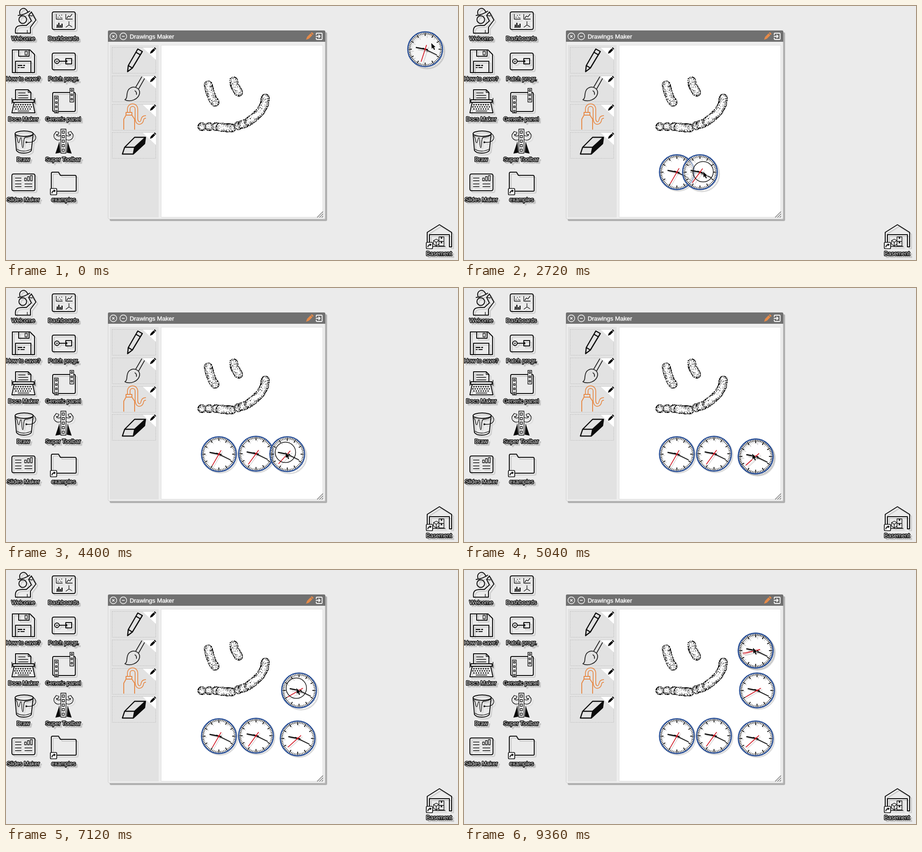
An HTML page with a canvas for the animation above (9.44 s loop, 998 by 561 pixels).

```html
<!DOCTYPE html>
<html lang="en">
<head>
<meta charset="utf-8">
<title>Drawings Maker</title>
<style>
  html, body { margin: 0; width: 100%; height: 100%; overflow: hidden; background: #ebebeb; }
  canvas { display: block; }
</style>
</head>
<body>
<canvas id="stage" width="998" height="561"></canvas>
<script>
const LOOP = 9440, STEP = 80;
const BACK = '#ebebeb', ORANGE = '#e68a48', INK = '#0c0c0c';
const stage = document.getElementById('stage');
const screen = stage.getContext('2d');
const desktop = document.createElement('canvas');
desktop.width = stage.width;
desktop.height = stage.height;
const d = desktop.getContext('2d');

// ---- path helpers ----
const box = (x, y, w, h) => `M${x},${y}h${w}v${h}h${-w}z`;
const disc = (x, y, r) => `M${x - r},${y}a${r},${r} 0 1 0 ${2 * r},0a${r},${r} 0 1 0 ${-2 * r},0z`;
const round = (x, y, w, h, r = 3) =>
  `M${x + r},${y}h${w - 2 * r}q${r},0 ${r},${r}v${h - 2 * r}q0,${r} ${-r},${r}h${2 * r - w}q${-r},0 ${-r},${-r}v${2 * r - h}q0,${-r} ${r},${-r}z`;

function line(path, color = INK, width = 2) {
  d.strokeStyle = color;
  d.lineWidth = width;
  d.stroke(new Path2D(path));
}
function fill(path, color = INK) {
  d.fillStyle = color;
  d.fill(new Path2D(path));
}
function text(str, x, y, size, color, outline) {
  d.font = `${size}px "Liberation Sans", Arial, sans-serif`;
  if (outline) {
    d.strokeStyle = outline;
    d.lineWidth = 3;
    d.strokeText(str, x, y);
  }
  d.fillStyle = color;
  d.fillText(str, x, y);
}

// ---- desktop icons ----
function icon({ label, x, y, lines = '', thin = '', solid = '', back = '', link }) {
  d.save();
  d.translate(4, 4);
  line(lines, '#cbcbcb', 2.2);
  line(thin, '#d6d6d6', 1.3);
  d.textAlign = 'center';
  text(label, x, y, 12.5, '#c6c6c6', '#c6c6c6');
  d.restore();
  line(lines, INK, 2);
  fill(back, BACK);
  line(back + thin, INK, 1.3);
  fill(solid);
  if (link) {
    const [lx, ly] = link;
    fill(round(lx, ly, 14, 14, 2), '#fff');
    line(round(lx, ly, 14, 14, 2), INK, 1.7);
    line(`M${lx + 3.5},${ly + 11}q0,-6 6,-6`, INK, 2);
    fill(`M${lx + 7.5},${ly + 2}l4.5,3.2l-4.5,3.6z`);
  }
  d.textAlign = 'center';
  text(label, x, y, 12.5, '#fff', '#000');
}

const strip = (x, y, w, count) =>
  Array.from({ length: count }, (_, i) => box(x + 2.5, y + 3 + i * (w + 1), w - 5, w - 5)).join('');
const keys = (x, y, count) =>
  Array.from({ length: count }, (_, i) => disc(x + i * 5.2, y, 1.5)).join('');

const ICONS = [
  { label: 'Welcome', x: 38, y: 76,
    lines: disc(37, 30, 8.5) + 'M26,21Q40,20 53,11M31,19C26,5 44,-1 48,14M21,60C19,46 25,43 36,43H45L56,33L50,21L56,13L66,31L54,47V60Z',
    thin: 'M51,21L59,22M47,53V60' },
  { label: 'Dashboards', x: 126.5, y: 76,
    lines: round(102, 13, 51, 39, 4),
    thin: 'M132,18V29H147M134,27L138,22L141,24L146,18M111,18V29H125M111,47H125M139,34V42L132,47M139,42L146,46',
    solid: [[115, 25], [118, 21], [120, 25], [123, 20], [123, 26]].map(p => disc(...p, .9)).join('') +
      box(112, 41, 2.5, 5) + box(115.5, 37, 2.5, 9) + box(119, 42, 2.5, 4) + box(122.5, 39, 2.5, 7) },
  { label: 'How to save?', x: 38, y: 165,
    lines: 'M14,97H53L63,107V147H14ZM28,97V111H51V97M21,147V122H55V147',
    thin: box(42, 100, 5, 8),
    solid: box(26, 130, 10, 2.5) + box(38, 130, 4, 2.5) + box(26, 135, 4, 2) + box(32, 135, 9, 2) },
  { label: 'Patch progr.', x: 127, y: 165,
    lines: round(102, 104, 51, 37, 4) + disc(112.5, 122, 5) + 'M118,122H132' + box(132, 116, 13, 12),
    solid: disc(112.5, 122, 1.5) + disc(133, 122, 2.4) },
  { label: 'Docs Maker', x: 38, y: 254,
    lines: 'M21,208V185H49L55,191V208M15,207H62V213H15ZM18,213L13,236H64L59,213',
    thin: 'M27,192H43M27,197.5H49M27,203H49M49,185V191H55M13,203V216M64,203V216M26,232H51',
    solid: keys(22, 218, 7) + keys(19.5, 222.8, 8) + keys(22, 227.5, 7) },
  { label: 'Generic panel', x: 126, y: 254,
    lines: round(103, 191, 50, 42, 3),
    back: box(107, 199, 8.5, 37) + box(141, 182, 8.5, 30),
    thin: strip(107, 199, 8.5, 4) + strip(141, 182, 8.5, 3) },
  { label: 'Draw', x: 38, y: 343,
    lines: 'M20,282a20,6 0 1 0 40,0a20,6 0 1 0 -40,0L23,319C28,327 50,327 56,319L60,282',
    thin: 'M60,281C72,290 65,303 46,301M21,287C27,290 25,302 28,302S30,291 33,291S34,313 37,313S37,291 43,290Q53,290 59,285M24,316Q38,325 56,316',
    solid: disc(45, 301, 2) },
  { label: 'Super Toolbar', x: 126, y: 343,
    thin: box(124, 276, 5, 5) + box(124, 286, 5, 5) + box(124, 296, 5, 5) + box(124, 306, 5, 5) + box(124, 316, 5, 5) +
      'M121,295C113,299 104,293 106,284L111,277L117,279L115,284L111,284Q113,289 121,286M133,295C141,299 150,293 148,284L143,277L137,279L139,284L143,284Q141,289 133,286',
    solid: 'M118,299L109,326L120,324ZM136,299L145,326L134,324Z',
    back: box(121, 272, 11.5, 53) },
  { label: 'Slides Maker', x: 38, y: 432,
    lines: round(13, 371, 51, 37, 4),
    thin: 'M20,380H34M20,386H34M20,393H34M20,399H34M41,393H58M41,399H58' +
      box(41, 380, 4, 6) + box(47.5, 377, 4, 9) + box(54, 374.5, 4, 11.5) },
  { label: 'examples', x: 127, y: 432, link: [98, 403],
    lines: 'M100,409V370Q100,367 103,367H116L120,374H152Q155,374 155,377V407Q155,409 153,409Z' },
  { label: 'Basement', x: 956, y: 551, link: [928, 522],
    lines: 'M930,528V500L957,483L984,500V532H979V505H935V528',
    thin: box(956, 510, 11, 10) + box(956, 520, 11, 10) + 'M950,515l6,3v8l-6,4l-6,-4v-8zM944,518l6,4l6,-4M950,522v8M942,531H970',
    solid: box(960, 510, 3, 4) + box(960, 520, 3, 4) },
];

// ---- window ----
function pencil(x, y, color) {
  d.save();
  d.translate(x, y);
  d.rotate(Math.PI / 4);
  fill('M-2.4,-8.5h4.8v2.3h-4.8zM-2.4,-5.2h4.8v9l-2.4,5l-2.4,-5z', color);
  d.restore();
}

function drawTools() {
  for (const y of [91, 154, 217, 279]) {
    d.setLineDash([2, 1.5]);
    line(box(234.5, y + .5, 96, 57), '#bdbdbd', 1);
    d.setLineDash([]);
    fill(`M302,${y + 1}H331V${y + 28}Z`, '#fff');
    pencil(324, y + 8, '#000');
  }
  line('M291,95L301,100.5L279,137L268.5,145L270,131.5ZM286.5,102L297,108M270,131.5L279,137', INK, 2.5);
  line('M262,207C270,204 264,193 271,184Q278,177 287,180Q296,184 295,193C292,207 274,213 262,207M286,180L300,156M293,183L306,160M284,187Q289,189 288,196', '#222', 1.8);
  const hose = 'M271,236V228C271,216 288,216 288,228V248C288,262 300,261 301,251Q302,245 309,245';
  line(hose, ORANGE, 7.5);
  line(hose, '#e2e2e2', 4);
  line('M260,273V250L265,241H278L284,250V273M265,241V235H278V241', ORANGE, 2);
  line('M262,312L284,290H308L306,304L281,327H257ZM262,312H284L308,290M284,312L281,327', INK, 2.4);
  fill('M284,312L308,290L306,304L281,327Z');
}

let seed = 7;
const random = () => (seed = seed * 16807 % 2147483647) / 2147483647;

function distance(x, y, [ax, ay], [bx, by]) {
  const dx = bx - ax, dy = by - ay;
  const along = ((x - ax) * dx + (y - ay) * dy) / (dx * dx + dy * dy || 1);
  const p = Math.min(1, Math.max(0, along));
  return Math.hypot(x - ax - dx * p, y - ay - dy * p);
}

// A stippled tube: white along its spine, dark towards the rim.
function tube(...points) {
  const R = 9.8, xs = points.map(p => p[0]), ys = points.map(p => p[1]);
  for (let y = Math.min(...ys) - 10; y <= Math.max(...ys) + 10; y++) {
    for (let x = Math.min(...xs) - 10; x <= Math.max(...xs) + 10; x++) {
      const rim = Math.min(...points.map((p, i) => distance(x, y, p, points[i + 1] || p))) / R;
      if (rim > 1) continue;
      d.fillStyle = random() < .06 + .86 * rim ** 2.8 ? '#000' : '#fff';
      d.fillRect(x, y, 1, 1);
    }
  }
}

function drawWindow() {
  fill(round(229, 58, 480, 417, 3), '#b0b0b0');
  fill(round(225, 54, 480, 417, 3), '#eeeeee');
  line(round(225.5, 54.5, 479, 416, 3), '#cdcdcd', 1);
  fill('M225,79V57Q225,54 228,54H702Q705,54 705,57V79Z', '#707070');
  line(disc(237, 67, 7.5) + disc(259, 67, 7.5) + 'M234.5,64.5l5,5m0,-5l-5,5M256,67h6', '#fff', 1.3);
  d.textAlign = 'left';
  text('Drawings Maker', 273, 72, 13.6, '#fff');
  d.strokeStyle = '#fff';
  d.lineWidth = .4;
  d.strokeText('Drawings Maker', 273, 72);
  d.save();
  d.translate(670, 67);
  d.scale(1.2, 1.2);
  pencil(0, 0, ORANGE);
  d.restore();
  line('M685,64V61.5Q685,60 686.5,60H696.5Q698,60 698,61.5V72.5Q698,74 696.5,74H686.5Q685,74 685,72.5V70M684,67H693M690,63.5L693.5,67L690,70.5', '#fff', 1.8);

  fill(box(229, 86, 108, 381), '#e2e2e2');
  fill(box(342, 86, 358, 381), '#fff');
  line(box(342.5, 86.5, 357, 380), '#dadada', 1);
  line('M687,467L700,454M692,467L700,459M697,467L700,464', '#666', 1.2);
  drawTools();

  tube([446, 174], [450, 190], [456, 205], [461, 212]);
  tube([502, 165], [504, 175], [513, 190]);
  for (const x of [432, 448, 463]) tube([x, 266]);
  tube([472, 267], [482, 268], [498, 269]);
  tube([512, 264]);
  tube([521, 261], [527, 259]);
  tube([535, 255], [548, 245], [561, 233], [570, 217], [572, 203]);
}

d.lineJoin = 'round';
d.fillStyle = BACK;
d.fillRect(0, 0, 998, 561);
ICONS.forEach(icon);
drawWindow();

// ---- clock ----
const handAngle = t => 198 + 6 * Math.floor(1.03 * t / 1000 + .4);

function spoke(g, degrees, from, to, width, color) {
  const a = degrees * Math.PI / 180, sx = Math.sin(a), sy = -Math.cos(a);
  g.strokeStyle = color;
  g.lineWidth = width;
  g.beginPath();
  g.moveTo(sx * from, sy * from);
  g.lineTo(sx * to, sy * to);
  g.stroke();
}
function clockParts(g, seconds, ink, rim, red) {
  for (let i = 0; i < 60; i++) {
    const major = i % 5 === 0;
    spoke(g, i * 6, major ? 29.5 : 33, 36.5, major ? 1.9 : 1.1, ink);
  }
  g.strokeStyle = rim;
  g.lineWidth = 2.8;
  g.beginPath();
  g.arc(0, 0, 38.3, 0, 7);
  g.stroke();
  spoke(g, 281, -6, 21, 2.6, ink);
  spoke(g, 116, -6, 29, 1.7, ink);
  spoke(g, seconds, -10, 29, 1.7, red);
  g.fillStyle = red;
  g.beginPath();
  g.arc(0, 0, 2, 0, 7);
  g.fill();
}
function clock(g, x, y, seconds, lift) {
  g.save();
  g.translate(x, y);
  g.fillStyle = 'rgba(255,255,255,.55)';
  g.beginPath();
  g.arc(0, 0, 39, 0, 7);
  g.fill();
  g.translate(lift, lift);
  const shade = 'rgba(0,0,0,.15)';
  clockParts(g, seconds, shade, shade, shade);
  g.translate(-lift, -lift);
  clockParts(g, seconds, '#0a0a0a', '#2f5499', '#cf1420');
  g.restore();
}

// ---- motion: time, clock x y, pointer x y ----
const KEYS = [
  [0, 925.5, 95.5, 939, 82],
  [240, 925.5, 95.5, 939, 82],
  [1440, 477, 354, 485, 345],
  [2000, 470, 367, 478, 358],
  [2320, 470, 367, 477, 365],
  [2720, 521, 367, 528, 366],
  [3200, 552, 366, 552, 363],
  [3760, 552, 366, 549, 363],
  [4400, 621, 367, 617, 363],
  [4880, 644, 372, 636, 366],
  [5440, 644, 372, 637, 366],
  [6800, 647, 266, 641, 261],
  [7520, 647, 266, 641, 261],
  [8720, 644, 178, 638, 172],
  [LOOP, 644, 178, 638, 172],
];
const STAMPS = [
  [2080, 470, 367], [3280, 552, 366], [4960, 644, 372], [7200, 647, 266], [9280, 644, 178],
];

function poseAt(t) {
  const i = KEYS.findIndex(k => k[0] > t), a = KEYS[i - 1], b = KEYS[i];
  const p = (t - a[0]) / (b[0] - a[0]), eased = p * p * (3 - 2 * p);
  return a.slice(1).map((v, j) => v + (b[j + 1] - v) * eased);
}

function drawPointer(x, y) {
  screen.save();
  screen.translate(x, y);
  const arrow = new Path2D('M0,0L1,12.5L3.6,10L6.2,15L8.2,14L5.8,9L9.2,8.4Z');
  screen.strokeStyle = '#fff';
  screen.lineWidth = 1.2;
  screen.stroke(arrow);
  screen.fillStyle = '#000';
  screen.fill(arrow);
  screen.restore();
}

function frame(now) {
  const t = Math.floor(now % LOOP / STEP) * STEP;
  const [x, y, px, py] = poseAt(t);
  screen.drawImage(desktop, 0, 0);
  for (const [at, sx, sy] of STAMPS) {
    if (t >= at) clock(screen, sx, sy, handAngle(at), 3);
  }
  clock(screen, x, y, handAngle(t), 4.5);
  const onPaper = px > 342 && px < 700 && py > 86 && py < 467;
  const pressing = STAMPS.some(([at]) => t >= at && t < at + 200);
  if (onPaper && !pressing) {
    screen.strokeStyle = '#111';
    screen.lineWidth = 1.5;
    screen.beginPath();
    screen.arc(px, py, 22.5, 0, 7);
    screen.stroke();
  }
  drawPointer(px, py);
  requestAnimationFrame(frame);
}
requestAnimationFrame(frame);
</script>
</body>
</html>
```
